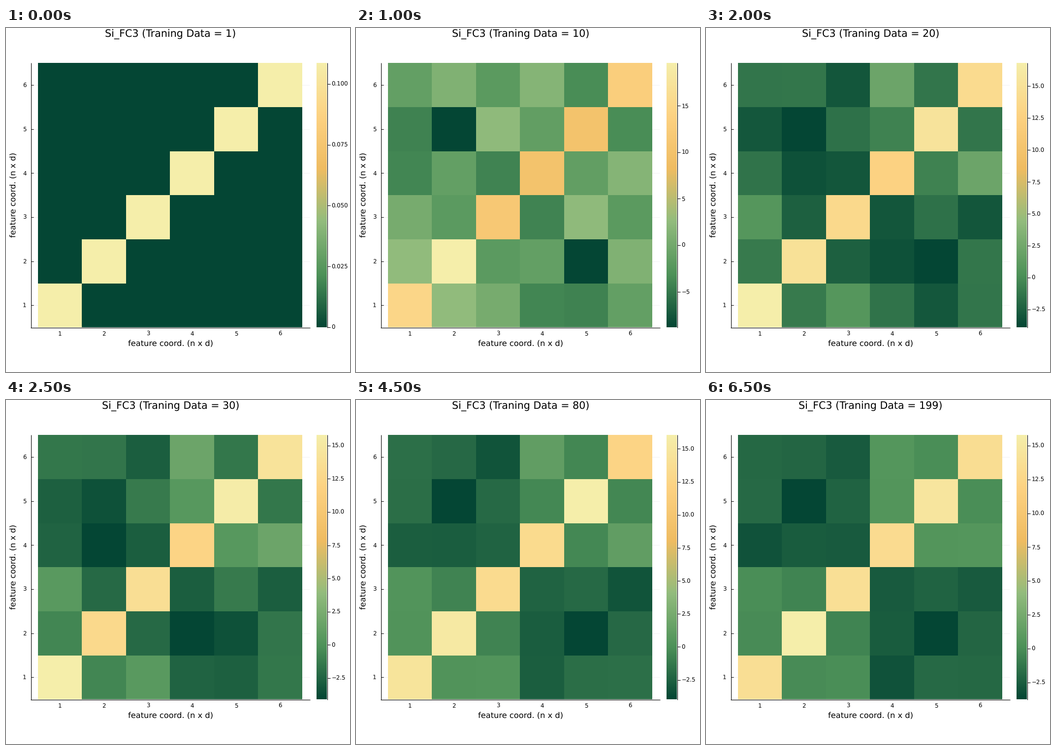
Write a matplotlib script that moves like this. It is 699 by 700 pixels and loops after 7 s.

```python
import math
import numpy as np
import matplotlib.pyplot as plt
from matplotlib.animation import FuncAnimation
from matplotlib.colors import LinearSegmentedColormap

plt.rcParams["font.family"] = "DejaVu Sans"
plt.rcParams["text.hinting"] = "none"

W, H, DPI = 699, 700, 64
LEFT, RIGHT, TOP, BOTTOM = 65, 602, 71.3, 609
BAR_L, BAR_R = 631, 652
CELL_W, CELL_H = (RIGHT - LEFT) / 6, (BOTTOM - TOP) / 6

STOPS = [(4, 70, 52), (78, 146, 89), (146, 188, 125),
         (239, 188, 98), (253, 210, 130), (245, 238, 170)]
CMAP = LinearSegmentedColormap.from_list(
    "field", [tuple(c / 255 for c in rgb) for rgb in STOPS], N=512)

# Value range, then the lower triangle row by row in percent of that range
MATRICES = [
    (-13.38, 22.25, [71, 55, 100, 37, 34, 63, 16, 37, 23, 57,
                     22.5, 0, 55, 34, 52, 33, 46, 35, 39, 21, 71]),
    (-4.27, 17.81, [100, 13.5, 96, 23, 7, 82, 18, 8.5, 5, 79,
                    5, 0, 12, 12, 87, 14.5, 15.5, 5, 31, 14.5, 82]),
    (-4.10, 15.80, [100, 17, 85, 23.5, 9.5, 89, 8, 0, 6.5, 82,
                    7, 3, 14, 23, 99, 13, 12.5, 6.5, 29, 13, 92]),
    (-4.155, 16.83, [94, 22.5, 93, 24.5, 12, 84, 6, 6.5, 7.5, 84,
                     18, 0, 9, 18.5, 100, 13.5, 8, 4, 27, 16, 76]),
    (-3.81, 15.40, [92, 19.5, 100, 18.5, 20, 89.5, 7, 6, 8, 88.5,
                    4.5, 0, 10, 16.5, 100, 9, 10.5, 3.5, 24.5, 18.5, 87]),
    (-3.74, 15.78, [89, 18.5, 100, 19, 16.5, 89.5, 3.5, 6, 5.5, 87,
                    9.5, 0, 8, 21.5, 94, 9, 8.5, 5.5, 22, 19, 88]),
]
COUNTS = [1, 5, 10, 15, 20, 30, 40, 50, 60, 80, 100, 120, 150, 199]
PROGRESS = [0, 1, 1.5, 2, 2.5, 3, 3.85, 4, 4.4, 4.55, 5, 5.15, 5.3, 6]


def symmetric(lo, hi, percent):
    m = np.zeros((6, 6))
    m[np.tril_indices(6)] = lo + (hi - lo) * np.array(percent) / 100
    return np.tril(m) + np.tril(m, -1).T


KEYS = [np.eye(6) * 0.1086] + [symmetric(*m) for m in MATRICES]


def matrix_at(pos):
    k = min(int(pos), len(KEYS) - 2)
    w = pos - k
    return KEYS[k] * (1 - w) + KEYS[k + 1] * w


def bar_ticks(lo, hi):
    span = hi - lo
    step, digits = (5, 0) if span > 25 else (2.5, 1) if span > 1 else (0.025, 3)
    for n in range(math.ceil(lo / step), math.floor(hi / step) + 1):
        label = f"{n * step:.{digits}f}".replace("-", "\u2212") if n else "0"
        yield BOTTOM - (n * step - lo) / span * (BOTTOM - TOP), label


fig = plt.figure(figsize=(W / DPI, H / DPI), dpi=DPI, facecolor="white")
ax = fig.add_axes([0, 0, 1, 1])


def text(x, y, s, px, ha="center", **kw):
    return ax.text(x, y, s, fontsize=px * 72 / DPI, ha=ha, va="baseline",
                   color="black", **kw)


def line(xs, ys, color="black", px=1.1, z=3):
    return ax.plot(xs, ys, color=color, lw=px * 72 / DPI, zorder=z,
                   solid_capstyle="butt")[0]


heat = ax.imshow(KEYS[0], cmap=CMAP, origin="lower", interpolation="nearest",
                 extent=(LEFT, RIGHT, BOTTOM, TOP), aspect="auto", zorder=2)
ax.imshow(np.linspace(1, 0, 538)[:, None], cmap=CMAP, interpolation="nearest",
          extent=(BAR_L, BAR_R, BOTTOM, TOP), aspect="auto", zorder=2)
ax.set_xlim(0, W)
ax.set_ylim(H, 0)
ax.axis("off")

for i in range(6):
    cx = LEFT + (i + 0.5) * CELL_W
    cy = BOTTOM - (i + 0.5) * CELL_H
    line([51, 617], [cy, cy], color="#f2f2f2", px=1, z=1)
    line([51, 55.5], [cy, cy])
    text(cx, 626, str(i + 1), 11.8)
    text(41.5, cy + 4.3, str(i + 1), 11.8, ha="right")

line([50.5, 50.5], [71, 610])
line([50, 617.5], [609.5, 609.5])
line([652.5, 652.5], [71, 610])
text(334.5, 647, "feature coord. (n x d)", 16.2)
text(20, 340, "feature coord. (n x d)", 16.2, rotation=90,
     rotation_mode="anchor")
title = text(334.5, 18, "", 20.6)

marks = [(line([653, 658.5], [0, 0]), text(661.5, 0, "", 11.8, ha="left"))
         for _ in range(12)]


def draw(frame):
    m = matrix_at(PROGRESS[frame])
    lo, hi = m.min(), m.max()
    heat.set_data(m)
    heat.set_clim(lo, hi)
    title.set_text(f"Si_FC3 (Traning Data = {COUNTS[frame]})")
    ticks = list(bar_ticks(lo, hi))
    for k, (tick, label) in enumerate(marks):
        shown = k < len(ticks)
        tick.set_visible(shown)
        label.set_visible(shown)
        if shown:
            y, s = ticks[k]
            tick.set_ydata([y, y])
            label.set_y(y + 4.3)
            label.set_text(s)
    return [heat, title]


anim = FuncAnimation(fig, draw, frames=len(COUNTS), interval=500,
                     init_func=lambda: draw(0), repeat=True, repeat_delay=0)
plt.show()
```
